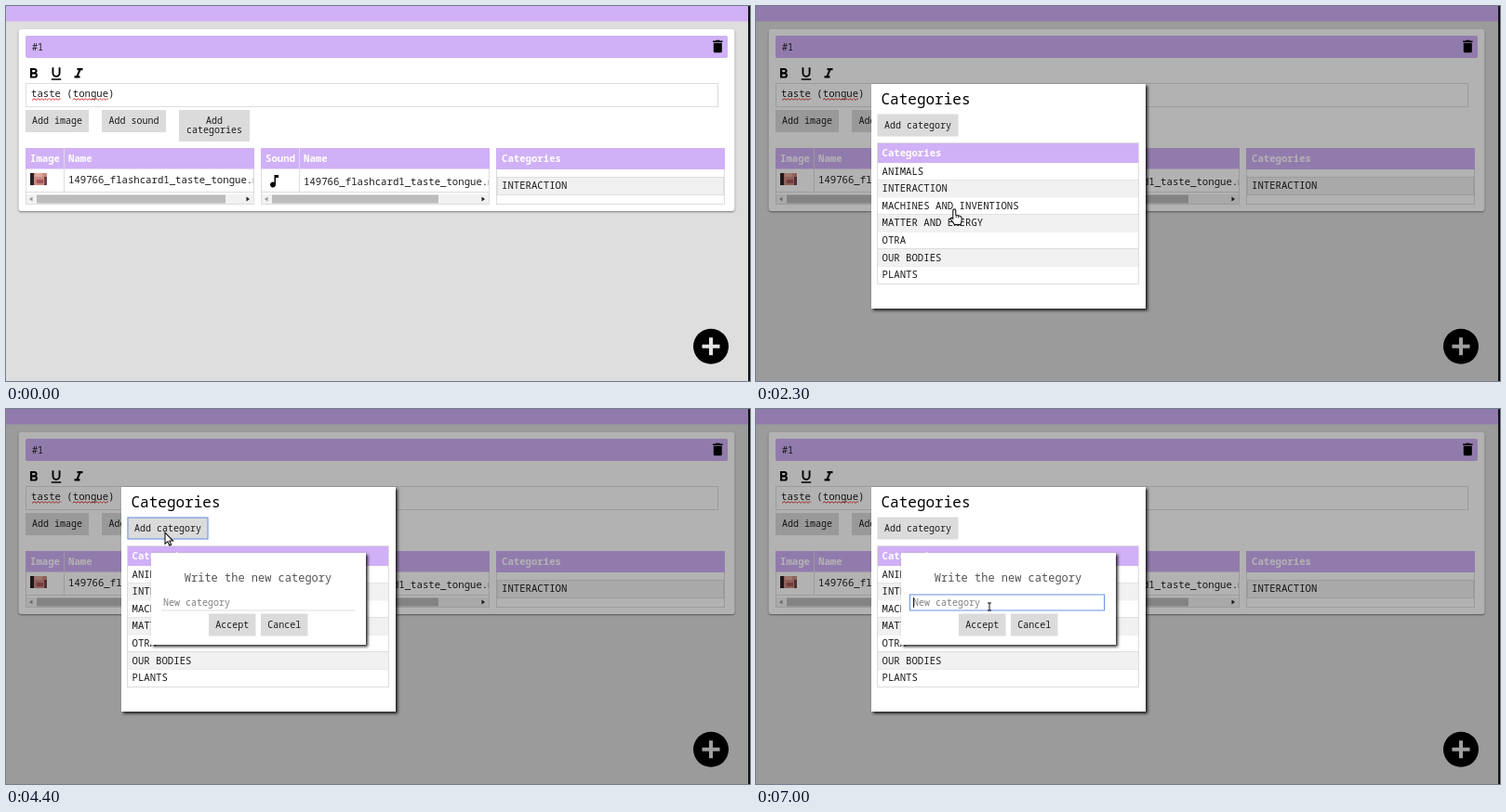
These frames come from a looping animation (800 px wide and 404 px high, 7100 ms). An HTML page with a canvas:

```html
<!DOCTYPE html>
<html lang="en">
<head>
<meta charset="utf-8">
<title>Flashcard categories</title>
<style>
  html, body { margin: 0; width: 100%; height: 100%; overflow: hidden; background: #dedede; }
  canvas { display: block; }
</style>
</head>
<body>
<canvas id="stage" width="800" height="404"></canvas>
<script>
const ctx = document.getElementById('stage').getContext('2d');
const LOOP = 7100, STEP = 100;
const OPEN_DIALOG = 1200, OPEN_PROMPT = 4200, FOCUS_INPUT = 6500;
const PURPLE = '#d0b0f6', GREY = '#dbdbdb', LINE = '#dddddd', INK = '#1c1c1c', BLUE = '#6595e4';
const MONO = '"Noto Sans Mono", "Liberation Mono", monospace';
const CATEGORIES = ['ANIMALS', 'INTERACTION', 'MACHINES AND INVENTIONS', 'MATTER AND ENERGY',
  'OTRA', 'OUR BODIES', 'PLANTS'];

const ICONS = {
  bold: 'M15.6 10.8c1-.7 1.65-1.8 1.65-2.8 0-2.26-1.75-4-4-4H7v14h7.04c2.1 0 3.7-1.7 3.7-3.8 0-1.5-.86-2.8-2.14-3.4zM10 6.5h3a1.5 1.5 0 0 1 0 3h-3zM13.5 15.5H10v-3h3.5a1.5 1.5 0 0 1 0 3z',
  underline: 'M12 17c3.3 0 6-2.7 6-6V3h-2.5v8a3.5 3.5 0 0 1-7 0V3H6v8c0 3.3 2.7 6 6 6zM5 19v2h14v-2z',
  italic: 'M10 4v3h2.2l-3.4 8H6v3h8v-3h-2.2l3.4-8H18V4z',
  trash: 'M6 19a2 2 0 0 0 2 2h8a2 2 0 0 0 2-2V7H6zM19 4h-3.5l-1-1h-5l-1 1H5v2h14z',
  note: 'M12 3v10.55A4 4 0 1 0 14 17V7h4V3z'
};
const CURSORS = {
  arrow: 'M0 0V12.3L2.9 9.7L4.8 14L6.7 13.2L4.9 9H8.6Z',
  hand: 'M-1.5 1.2a1.5 1.5 0 0 1 3 0V6l4.4 1q2 .5 2 2.4v2q0 2-1.4 5h-6.4q-1-2.2-3.7-5.2q-1.5-2 .6-2.3l1.5 1.2z'
};

// Pointer stops: time, x, y
const STOPS = [[100, 770, 328], [400, 428, 328], [700, 300, 286], [1000, 223, 134], [1100, 223, 134],
  [1200, 218.5, 135], [1800, 218.5, 135], [2500, 212, 240], [3200, 214, 200], [3400, 214, 200],
  [3900, 171, 133], [4700, 171, 133], [5500, 247, 234], [5900, 247, 234], [6400, 251, 213], [LOOP, 251, 213]];

let pointer, pointerKind;

function pointerAt(t) {
  const i = STOPS.findIndex(s => s[0] > t);
  if (i < 1) return null;
  const [t0, x0, y0] = STOPS[i - 1], [t1, x1, y1] = STOPS[i];
  const p = (t - t0) / (t1 - t0), e = p * p * (3 - 2 * p);
  return { x: x0 + (x1 - x0) * e, y: y0 + (y1 - y0) * e };
}

const hovers = (x, y, w, h) => pointer && pointer.x >= x && pointer.x <= x + w &&
  pointer.y >= y && pointer.y <= y + h;

function rect(x, y, w, h, fill, stroke) {
  if (fill) { ctx.fillStyle = fill; ctx.fillRect(x, y, w, h); }
  if (stroke) { ctx.strokeStyle = stroke; ctx.lineWidth = 1; ctx.strokeRect(x + .5, y + .5, w - 1, h - 1); }
}

function rounded(x, y, w, h, r, fill) {
  ctx.fillStyle = fill;
  ctx.beginPath();
  ctx.roundRect(x, y, w, h, r);
  ctx.fill();
}

function shadowed(blur, dx, dy, color, paint) {
  ctx.save();
  ctx.shadowBlur = blur;
  ctx.shadowOffsetX = dx;
  ctx.shadowOffsetY = dy;
  ctx.shadowColor = color;
  paint();
  ctx.restore();
}

function text(str, x, y, { size = 10.67, color = INK, weight = 400, align = 'left' } = {}) {
  ctx.font = `${weight} ${size}px ${MONO}`;
  ctx.fillStyle = color;
  ctx.textAlign = align;
  ctx.fillText(str, x, y);
}

const heading = (str, x, y) => text(str, x, y, { color: '#fff', weight: 700 });

function icon(name, x, y) {
  ctx.save();
  ctx.translate(x, y);
  ctx.scale(.75, .75);
  ctx.fillStyle = '#000';
  ctx.fill(new Path2D(ICONS[name]));
  ctx.restore();
}

function button(lines, x, y, w, h, { focus = false, enabled = true } = {}) {
  const hot = enabled && hovers(x, y, w, h);
  if (hot) pointerKind = 'hand';
  rect(x, y, w, h, hot && !focus ? '#f6f6f6' : GREY, focus && BLUE);
  lines.forEach((line, i) => text(line, x + w / 2, y + 15.3 + i * 9.7, { size: 10, align: 'center' }));
}

function squiggle(x0, x1, y) {
  ctx.strokeStyle = '#e0403c';
  ctx.lineWidth = 1;
  ctx.beginPath();
  for (let x = x0; x <= x1; x++) ctx.lineTo(x, y + Math.sin(x * 1.6) * .9);
  ctx.stroke();
}

function triangle(x, y, dir, color) {
  ctx.fillStyle = color;
  ctx.beginPath();
  ctx.moveTo(x + 2 * dir, y);
  ctx.lineTo(x - 1.5 * dir, y - 2.5);
  ctx.lineTo(x - 1.5 * dir, y + 2.5);
  ctx.fill();
}

function fileTable(x, split, thumbWidth, label, textY) {
  rect(x, 153, 246, 61, '#fff', LINE);
  rect(x, 153, 246, 22.5, PURPLE);
  rect(split, 153, 1, 47, LINE);
  rect(x, 200, 246, 1, LINE);
  heading(label, x + 5, 168);
  heading('Name', split + 5, 168);
  ctx.save();
  ctx.beginPath();
  ctx.rect(x, 175, 245, 28);
  ctx.clip();
  text('149766_flashcard1_taste_tongue.mp3', split + 5, textY);
  ctx.restore();
  rect(x + 1, 203, 244, 10, '#f1f1f1');
  rect(x + 12, 203.5, thumbWidth, 9, '#bcbcbc');
  triangle(x + 6, 208, -1, '#999');
  triangle(x + 239, 208, 1, '#222');
}

function photo() {
  rect(26, 180, 18, 13, '#c98c80');
  rect(26, 180, 4, 13, '#2c2024');
  rect(31, 180, 8, 4, '#e0aa9c');
  rect(33, 187, 7, 4, '#a95358');
  rect(41, 184, 3, 9, '#70424a');
}

function page(t) {
  const enabled = t < OPEN_DIALOG;
  rect(0, 0, 800, 404, '#dedede');
  rect(0, 0, 800, 16.5, PURPLE);
  shadowed(2, 0, 1, 'rgba(0,0,0,.45)', () => rounded(13.5, 25, 770, 196, 3, '#fff'));
  rounded(21, 32, 755, 24, 2, PURPLE);
  text('#1', 28, 47.5, { size: 10 });
  icon('trash', 756.3, 34.5);
  icon('bold', 20.7, 64);
  icon('underline', 45, 64);
  icon('italic', 69, 64);

  rect(21, 83, 745, 26, '#fff', LINE);
  text('taste (tongue)', 27, 98);
  squiggle(28, 59, 100.5);
  squiggle(72, 110, 100.5);
  button(['Add image'], 21, 112, 68, 24, { enabled });
  button(['Add sound'], 103, 112, 69, 24, { enabled });
  button(['Add', 'categories'], 186, 112, 76, 34, { enabled, focus: t >= 1000 && enabled });

  fileTable(21, 62, 203, 'Image', 190.5);
  photo();
  fileTable(274, 315, 179, 'Sound', 192.5);
  icon('note', 279.5, 179.8);

  rect(527, 153, 246, 61, '#fff', LINE);
  rect(527, 153, 246, 23, PURPLE);
  heading('Categories', 533, 168);
  rect(528, 184, 244, 20, '#f1f1f1', LINE);
  text('INTERACTION', 533, 197.3);

  ctx.fillStyle = '#000';
  ctx.beginPath();
  ctx.arc(758, 366.7, 19, 0, 7);
  ctx.fill();
  rect(748.5, 364.7, 19, 4, '#e4e4e4');
  rect(756, 357.2, 4, 19, '#e4e4e4');
}

function dialog(t) {
  const enabled = t < OPEN_PROMPT;
  rect(0, 0, 800, 404, 'rgba(0,0,0,.3)');
  shadowed(3, 2, 2, 'rgba(0,0,0,.85)', () => rect(124, 84, 295, 242, '#fff'));
  text('Categories', 134.5, 105.5, { size: 16, color: '#000', weight: 500 });
  button(['Add category'], 130.5, 116.5, 87, 24, { enabled, focus: t >= 4100 && t < FOCUS_INPUT });

  rect(131, 147, 281, 22, PURPLE);
  heading('Categories', 135.5, 161.5);
  CATEGORIES.forEach((name, i) => {
    const y = 169 + i * 18.6;
    rect(131, y, 281, 18.6, i % 2 ? '#f1f1f1' : '#fff');
    rect(131, Math.round(y + 18), 281, 1, LINE);
    text(name, 135.5, y + 12.6);
  });
  rect(130, 147, 282, 153, null, LINE);
  if (enabled && hovers(131, 169, 280, 130)) pointerKind = 'hand';
}

function prompt(t) {
  shadowed(3, 2, 2, 'rgba(0,0,0,.85)', () => rect(156, 155, 231, 99, '#fff'));
  text('Write the new category', 271, 186, { size: 12, color: '#555', align: 'center' });
  text('New category', 169, 211.5, { size: 10, color: '#808080' });
  if (t < FOCUS_INPUT) {
    rect(167, 216.5, 208, 1, LINE);
  } else {
    rect(165, 199.5, 210, 18, null, BLUE);
    rect(169, 203, 1, 11, '#222');
  }
  button(['Accept'], 218, 220.5, 50.5, 24);
  button(['Cancel'], 274, 220.5, 50.5, 24);
  if (hovers(165, 199, 210, 18)) pointerKind = 'text';
}

function drawPointer() {
  const { x, y } = pointer;
  if (pointerKind === 'text') {
    rect(x - .5, y - 4, 1, 8, '#111');
    rect(x - 2, y - 4.5, 4, 1, '#111');
    rect(x - 2, y + 3.5, 4, 1, '#111');
    return;
  }
  const shape = new Path2D(CURSORS[pointerKind]);
  ctx.save();
  ctx.translate(x, y);
  ctx.fillStyle = '#fff';
  ctx.strokeStyle = '#111';
  ctx.lineWidth = 1.1;
  ctx.fill(shape);
  ctx.stroke(shape);
  if (pointerKind === 'hand') {
    rect(1.5, 6, .8, 3, '#111');
    rect(4, 6.6, .8, 2.6, '#111');
  }
  ctx.restore();
}

function render(now) {
  const t = Math.floor(now % LOOP / STEP) * STEP;
  pointer = pointerAt(t);
  pointerKind = 'arrow';
  page(t);
  if (t >= OPEN_DIALOG) dialog(t);
  if (t >= OPEN_PROMPT) prompt(t);
  if (pointer) drawPointer();
  rect(798, 0, 2, 404, '#111');
  requestAnimationFrame(render);
}
requestAnimationFrame(render);
</script>
</body>
</html>
```
